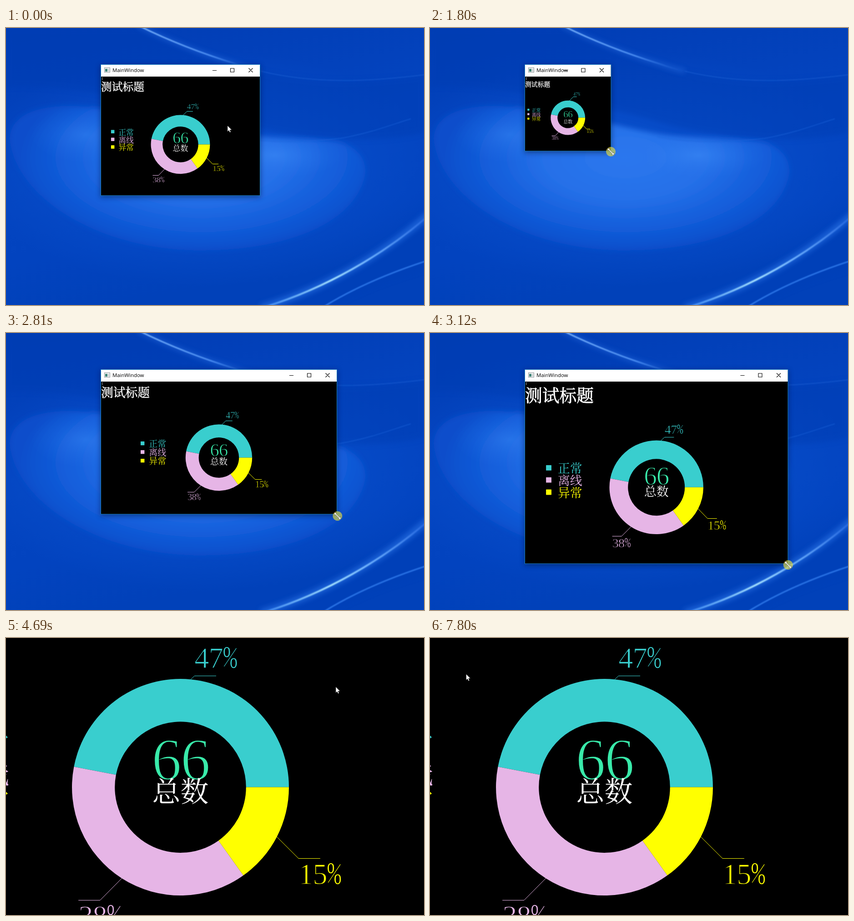
Animation of 919 by 610 pixels, one loop 7.95 s. Source, as an HTML page:

```html
<!DOCTYPE html>
<html lang="zh">
<head>
<meta charset="utf-8">
<title>Ring chart window</title>
<style>
html, body { margin: 0; width: 100%; height: 100%; overflow: hidden; background: #0241ba; }
svg { display: block; width: 919px; height: 610px; }
.cjk { font-family: "Noto Serif CJK SC", "Noto Sans CJK SC", "Noto Sans CJK", serif; font-weight: 200; }
.title { font-weight: 500; stroke: #fff; stroke-width: .02em; }
.num { font-family: "Liberation Serif", serif; stroke: #000; stroke-width: .022em; letter-spacing: -.02em; }
.pct { font-family: "Noto Sans Mono CJK SC", "Liberation Mono", monospace; font-weight: 300; }
.bar { font-family: "Open Sans", "Noto Sans", sans-serif; font-size: 11.4px; }
</style>
</head>
<body>
<svg viewBox="0 0 919 610" xmlns="http://www.w3.org/2000/svg">
  <defs>
    <linearGradient id="sky" x2="0.25" y2="1">
      <stop offset="0" stop-color="#013db4"/>
      <stop offset=".5" stop-color="#0445c1"/>
      <stop offset=".8" stop-color="#0243bf"/>
      <stop offset="1" stop-color="#0141b9"/>
    </linearGradient>
    <radialGradient id="glow" gradientUnits="userSpaceOnUse" cx="0" cy="0" r="1" gradientTransform="translate(430 285) scale(400 205)">
      <stop offset="0" stop-color="#2c77ee"/>
      <stop offset=".45" stop-color="#2570e8"/>
      <stop offset=".75" stop-color="#145edb"/>
      <stop offset="1" stop-color="#084ecb"/>
    </radialGradient>
    <radialGradient id="spot">
      <stop offset="0" stop-color="#3d8bf6" stop-opacity=".75"/>
      <stop offset="1" stop-color="#2a74ec" stop-opacity="0"/>
    </radialGradient>
    <radialGradient id="halo">
      <stop offset=".5" stop-color="#0a52cf"/>
      <stop offset="1" stop-color="#0a52cf" stop-opacity="0"/>
    </radialGradient>
    <linearGradient id="ray" gradientUnits="userSpaceOnUse" x1="290" y1="0" x2="560" y2="0">
      <stop offset="0" stop-color="#7fb8ff"/>
      <stop offset=".6" stop-color="#4d90f4"/>
      <stop offset="1" stop-color="#1c62d8" stop-opacity="0"/>
    </linearGradient>
    <linearGradient id="arc" gradientUnits="userSpaceOnUse" x1="570" y1="0" x2="919" y2="0">
      <stop offset="0" stop-color="#3a86f2"/>
      <stop offset=".42" stop-color="#a5e2ff"/>
      <stop offset=".65" stop-color="#6fb2ff"/>
      <stop offset="1" stop-color="#2668e0"/>
    </linearGradient>
    <filter id="b1" x="-20%" y="-20%" width="140%" height="140%"><feGaussianBlur stdDeviation="1.1"/></filter>
    <filter id="b6" x="-20%" y="-20%" width="140%" height="140%"><feGaussianBlur stdDeviation="6"/></filter>
  </defs>

  <g id="desk" fill="none">
    <rect width="919" height="610" fill="url(#sky)"/>
    <ellipse cx="440" cy="310" rx="520" ry="260" fill="url(#halo)" opacity=".55"/>
    <path d="M0 0H300C390 48 470 70 560 95C700 125 800 118 919 104V230C800 262 600 240 480 200C330 160 100 120 0 130Z" fill="#013cb3" opacity=".5" filter="url(#b6)"/>
    <path d="M8 245C10 190 70 170 150 172C300 178 420 222 520 236C620 250 700 242 735 252C780 265 800 300 785 340C750 440 600 490 430 490C200 490 20 370 8 245Z" fill="url(#glow)" filter="url(#b6)"/>
    <ellipse cx="175" cy="235" rx="120" ry="62" fill="url(#spot)" opacity=".55"/>
    <ellipse cx="590" cy="280" rx="150" ry="52" fill="url(#spot)" opacity=".7"/>
    <path d="M500 240C600 258 690 248 735 243C800 232 850 212 890 200" stroke="#1e66dc" stroke-width="2" opacity=".5" filter="url(#b1)"/>
    <path d="M560 95C680 124 800 118 919 103" stroke="#1c60d4" stroke-width="2" opacity=".6" filter="url(#b1)"/>
    <path d="M290 -6C370 34 450 62 505 79C525 86 545 92 560 95" stroke="#2b70e2" stroke-width="8" opacity=".55" filter="url(#b6)"/>
    <path d="M290 -6C370 34 450 62 505 79C525 86 545 92 560 95" stroke="url(#ray)" stroke-width="3" filter="url(#b1)"/>
    <path d="M560 618C700 575 830 500 930 408V530C830 556 760 590 700 620Z" fill="#023fb8" opacity=".7" filter="url(#b6)"/>
    <path d="M560 616C690 578 820 505 930 410" stroke="#2c74e8" stroke-width="15" opacity=".6" filter="url(#b6)"/>
    <path d="M570 614C700 574 830 500 930 412" stroke="url(#arc)" stroke-width="4" filter="url(#b1)"/>
    <path d="M695 616C760 575 840 540 930 511" stroke="#2f78ea" stroke-width="3" filter="url(#b1)"/>
  </g>
  <g id="win"></g>
  <g id="mouse"></g>
</svg>
<script>
const LOOP = 7950;
const $ = id => document.getElementById(id);

function add(parent, tag, attrs = {}, text) {
  const e = document.createElementNS('http://www.w3.org/2000/svg', tag);
  set(e, attrs);
  if (text) e.textContent = text;
  parent.appendChild(e);
  return e;
}
function set(e, attrs) {
  for (const k in attrs) e.setAttribute(k, attrs[k]);
}

// Bursts of motion: start, end, number of screen updates.
const BURSTS = [[70, 620, 8], [870, 1640, 10], [1720, 2110, 6], [2280, 3040, 11],
  [3120, 3820, 10], [4130, 4460, 5], [4690, 4690, 1], [5700, 5920, 4],
  [6240, 6390, 3], [7660, 7800, 3]];

// Lower right corner of the window.
const CORNER = [[0, 558.5, 369], [800, 558.5, 369], [870, 556, 367], [1212, 493.5, 322.5],
  [1640, 406, 270], [1720, 404, 274], [1876, 392, 268], [2110, 398, 276],
  [2280, 420, 284], [2432, 506, 304.5], [2812, 727.5, 399], [3040, 778, 490],
  [3120, 787, 508], [3198, 791, 523], [3276, 790, 518.5]];
const GROW = [[4212.5, 0], [4295, .55], [4377.5, .93], [4460, 1]];
const FULL = [-576.5, -225.5, 1343.5, 693];

const POINTER = [[0, 487, 215], [541, 557, 368], [620, 558.5, 370.5]];
const AFTER = [[3276, 791, 520], [3510, 768, 320], [3740, 727, 116], [3820, 725, 106],
  [4460, 725, 106], [4690, 725, 107.5], [5627, 725, 107.5], [5773, 470, 113],
  [5920, 262, 100], [6165, 262, 100], [6315, 150, 35], [7600, 150, 35],
  [7660, 12, 12], [7800, 79.5, 79.5]];

function quantize(t) {
  let q = 0;
  for (const [a, b, n] of BURSTS) {
    if (t < a) break;
    const dt = n > 1 ? (b - a) / (n - 1) : 1;
    q = Math.min(b, a + dt * Math.floor((t - a) / dt + .05));
  }
  return q;
}
function at(keys, t) {
  if (t <= keys[0][0]) return keys[0].slice(1);
  for (let i = 1; i < keys.length; i++) {
    const a = keys[i - 1], b = keys[i];
    if (t <= b[0]) {
      const f = (t - a[0]) / (b[0] - a[0]);
      return a.slice(1).map((v, j) => v + (b[j + 1] - v) * f);
    }
  }
  return keys[keys.length - 1].slice(1);
}

// Window frame
const win = $('win');
const shadow = add(win, 'rect', { fill: '#001440', opacity: .5, filter: 'url(#b6)' });
const body = add(win, 'rect', { fill: '#000', stroke: '#1c84c6' });
const bar = add(win, 'rect', { fill: '#fff' });
const hover = add(win, 'rect', { width: 40, height: 26 });
const badge = add(win, 'g');
add(badge, 'rect', { x: 8, y: 7.5, width: 12, height: 10, fill: '#f4f6f6', stroke: '#8e9498' });
add(badge, 'rect', { x: 9.5, y: 10, width: 5, height: 6, fill: '#3f8578' });
add(badge, 'rect', { x: 16, y: 10, width: 2, height: 6, fill: '#b9c2c4' });
add(badge, 'text', { x: 25.5, y: 17.3, class: 'bar' }, 'MainWindow');
const buttons = add(win, 'path', {
  d: 'M-104.5 13.5h9M-65 9h8v8h-8zM-25 8.5l9 9M-16 8.5l-9 9',
  fill: 'none', stroke: '#000', 'stroke-width': 1.1
});

// Chart
const dots = add(win, 'path', { d: 'M2.5 2h1.5v1.5h-1.5zM2.5 5h1.5v1.5h-1.5z', fill: '#ddd' });
const title = add(win, 'text', { class: 'cjk title', fill: '#fff' }, '测试标题');

const COUNTS = [['正常', 31, '#39cece'], ['离线', 25, '#e6b5e6'], ['异常', 10, '#ffff00']];
const all = COUNTS.reduce((n, c) => n + c[1], 0);
const total = add(win, 'text', { class: 'num', fill: '#39eaaa', 'text-anchor': 'middle' }, String(all));
const caption = add(win, 'text', { class: 'cjk', fill: '#fff', 'text-anchor': 'middle' }, '总数');

let sum = 0;
const slices = COUNTS.map(([name, count, fill]) => {
  const turn = 2 * Math.PI / all;
  const from = sum * turn;
  sum += count;
  const label = add(win, 'text', { class: 'num', fill }, String(Math.round(100 * count / all)));
  add(label, 'tspan', { class: 'pct' }, '%');
  return {
    from, to: sum * turn, label,
    ring: add(win, 'path', { fill }),
    line: add(win, 'path', { fill: 'none', stroke: fill }),
    mark: add(win, 'rect', { fill, rx: .6 }),
    text: add(win, 'text', { class: 'cjk', fill }, name)
  };
});

// Pointer
const mouse = $('mouse');
const press = add(mouse, 'circle', { r: 10.5, fill: '#efe337', opacity: .62 });
const arrow = add(mouse, 'path', {
  d: 'M0 0V13.2L3 10.4L5 15.1L7.2 14.1L5.2 9.6H9.4Z',
  fill: '#fff', stroke: '#000', 'stroke-width': .5
});
const sizer = add(mouse, 'path', {
  d: 'M-7 -7H-1.5L-3.4 -4.9L4.9 3.4L7 1.5V7H1.5L3.4 4.9L-4.9 -3.4L-7 -1.5Z',
  fill: '#fff', stroke: '#222', 'stroke-width': .5
});

const show = (e, on) => e.setAttribute('visibility', on ? 'visible' : 'hidden');
const move = (e, x, y) => e.setAttribute('transform', `translate(${x} ${y})`);
const crisp = v => Math.floor(v) + .5;

function drawChart(left, top, right, bottom) {
  const h = bottom - top;
  const r = .2757 * (h - 26.5);
  const cx = (left + right) / 2, cy = top + .6 * h - 7.8;
  const em = .26 * r, inner = .605 * r;
  const pos = (a, d) => [cx + d * Math.cos(a), cy - d * Math.sin(a)];

  move(dots, left, top);
  const size = .366 * r;
  set(title, { x: left + .5, y: top + 9.8 + .19 * r + .38 * size, 'font-size': size });
  set(total, { x: cx, y: cy + 2.4 - .081 * r, 'font-size': .555 * r });
  set(caption, { x: cx, y: cy + 8.5 + .38 * em, 'font-size': em });

  slices.forEach((s, i) => {
    const big = s.to - s.from > Math.PI ? 1 : 0;
    set(s.ring, {
      d: `M${pos(s.from, r)}A${r} ${r} 0 ${big} 0 ${pos(s.to, r)}` +
         `L${pos(s.to, inner)}A${inner} ${inner} 0 ${big} 1 ${pos(s.from, inner)}Z`
    });

    const [x, y] = pos((s.from + s.to) / 2, r);
    const sx = x < cx ? -1 : 1, sy = y < cy ? -1 : 1;
    const leg = .2 * r, slant = i ? leg : 8.2;
    const ex = x + sx * slant, ey = crisp(y + sy * slant + .3);
    set(s.line, { d: `M${x} ${y}L${ex} ${ey}h${sx * leg}` });
    set(s.label, {
      x: sx < 0 ? ex - leg : ex,
      y: ey + (sy < 0 ? -.073 : .235) * r,
      'font-size': .272 * r
    });

    const row = cy - 2 - .127 * r + (i - 1) * em, side = .115 * r;
    set(s.mark, { x: cx - 2.35 * r, y: row - 1 - side / 2, width: side, height: side });
    set(s.text, { x: cx - 2.1 * r, y: row + .38 * em, 'font-size': em });
  });
}

function drawWindow(q) {
  const k = at(GROW, q)[0];
  const [l, t, r, b] = [208.5, 80, ...at(CORNER, q)].map((v, i) => v + (FULL[i] - v) * k);
  const w = r - l, h = b - t;
  show($('desk'), k < 1);
  show(shadow, k < 1);
  set(shadow, { x: l - 1, y: t + 2, width: w + 2, height: h + 2 });
  set(body, { x: l, y: t + .5, width: w, height: h - .5 });
  set(bar, { x: l + .5, y: t + 1, width: w - 1, height: 26 });
  move(badge, l, t);
  move(buttons, r, t);
  show(hover, q >= 3810);
  set(hover, { x: r - 80.5, y: t + .5, fill: q >= 4130 ? '#ccc' : '#e5e5e5' });
  drawChart(l, t + 27, r, b);
}

function drawPointer(q) {
  const drag = q >= 870 && q < 3270;
  const gone = q >= 4460 && q < 4690 || q >= 6390 && q < 7660;
  const sizing = drag || q >= 615 && q < 870;
  let [x, y] = at(q < 870 ? POINTER : AFTER, q);
  if (drag) {
    [x, y] = at(CORNER, q + 6);
    y += 1.5;
  }
  show(press, drag || q >= 4130 && q < 4212);
  show(arrow, !sizing && !gone);
  show(sizer, sizing);
  move(mouse, x, y);
}

let last = -1;
const start = performance.now();
function tick(now) {
  const q = quantize(Math.max(0, now - start) % LOOP);
  if (q !== last) {
    drawWindow(q);
    drawPointer(q);
    last = q;
  }
  requestAnimationFrame(tick);
}
tick(start);
</script>
</body>
</html>
```
